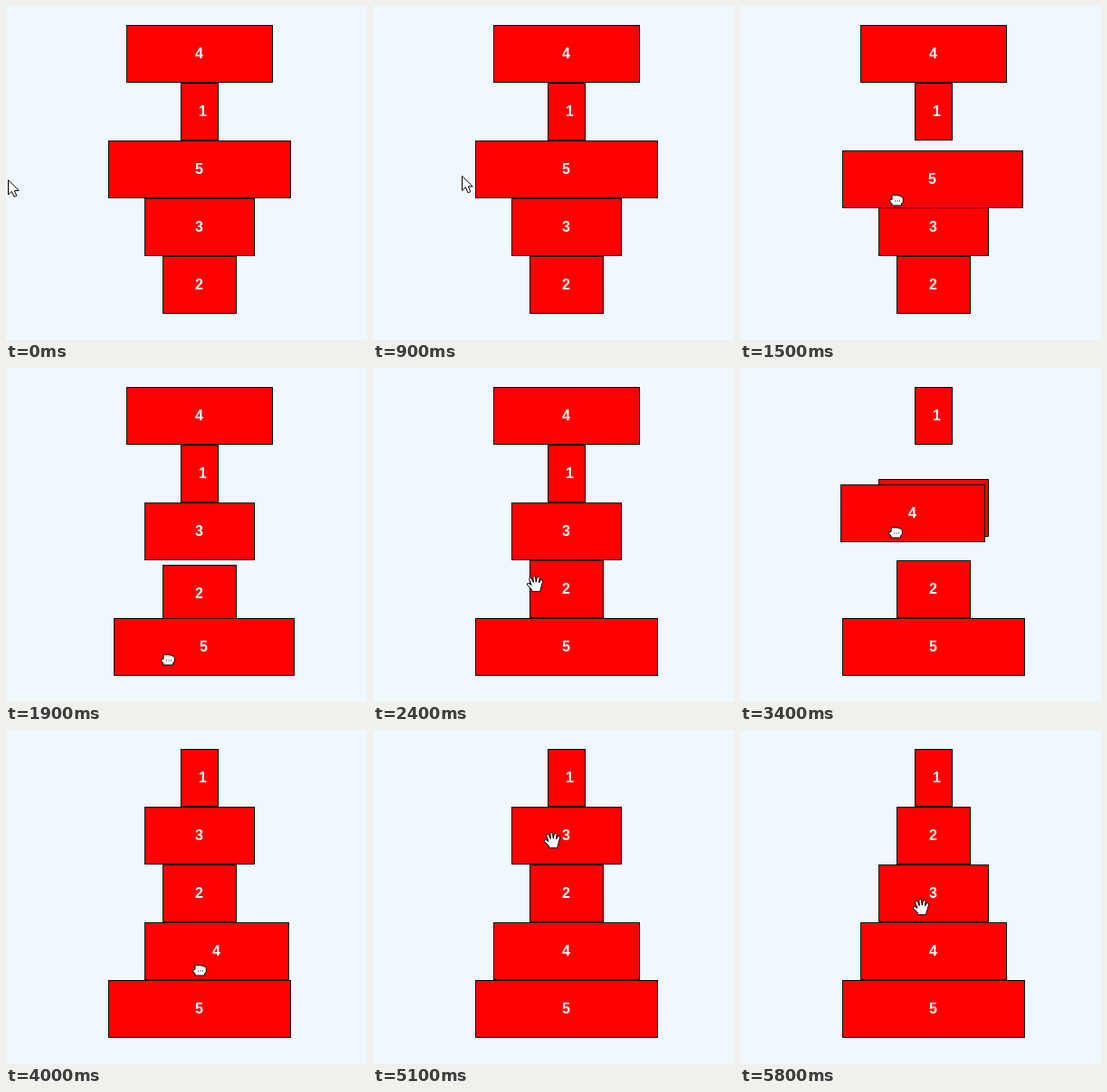
An HTML page for the animation above (6.3 s loop, 399x370 px).

```html
<!DOCTYPE html>
<html lang="en">
<head>
<meta charset="utf-8">
<title>Sorting blocks</title>
<style>
  html, body { margin: 0; width: 100%; height: 100%; overflow: hidden; background: #f0f8ff; }
  .block {
    position: absolute; left: 0; top: 0; height: 64px; box-sizing: border-box;
    border: 1px solid #000; background: #f00; color: #fff; text-indent: -1px;
    font: bold 16px/62px "Liberation Sans", Arial, sans-serif; text-align: center;
  }
  .block:first-child { padding-left: 8px; }
  .drag { z-index: 1; }
  svg { position: absolute; left: 0; top: 0; z-index: 2; overflow: visible; }
  svg path { fill: #fff; stroke: #000; stroke-linejoin: round; }
</style>
</head>
<body>
<div id="stage"></div>
<svg id="pointer" width="20" height="22">
  <path id="arrow" d="M.5 .8V17L4.4 13.4L7 19.4L9.8 18.2L7.3 12.4H12.2Z"/>
  <path id="open" transform="translate(-9.5 -9.5)" d="M6.5 18.2L5.5 15.5L.9 10.8Q.5 8.6 2.8 9L5.5 11L3.2 4.5Q3.2 2.3 5.4 3L7.8 8L7.4 2Q8.5 0 10 1.8L10.7 7.6L12 2.2Q13.8 1 14.6 3L14 8.5L15.8 5.2Q18.4 4.4 18.2 6.8L16.6 12.5L15 18.2Z"/>
  <path id="closed" transform="translate(-8 -6.5)" d="M3 12.5V10.5L.8 8.5V6H3V2.5Q3 1 4.7 1Q6 1 6.2 1.6Q8 .2 9.3 1.6Q11 .8 12.2 2.3Q15 2 15.3 4.5V8.5L13.5 10.5V12.5ZM6.5 7v1M9 7v1M11.5 7v1"/>
</svg>
<script>
const LOOP = 6300, TICK = 100, TOP = 21, ROW = 64;
const GLIDE = 215, GAP = 120, SNAP = 10;

// Each drag: held block, grip inside it, and the blocks it passes, from time `pass` on.
const order = [4, 1, 5, 3, 2];
const drags = [
  { n: 5, grab: 1400, drop: 2100, grip: [60, 55], passed: [3, 2], pass: 1604 },
  { n: 4, grab: 3300, drop: 4000, grip: [61, 53], passed: [1, 3, 2], pass: 3185 },
  { n: 3, grab: 5300, drop: 5500, grip: [85, 37], passed: [2], pass: 5380 }
];

// Pointer key points: [time, x, y]
const path = [
  [600, 2, 192], [1000, 130, 186], [1200, 178, 204], [1400, 174, 206], [1500, 173, 215],
  [1900, 179, 323], [2100, 234, 339], [2400, 179, 239], [2700, 179, 239], [2900, 177, 53],
  [3100, 176, 72], [3400, 172, 182], [3600, 180, 266], [4000, 214, 266], [4400, 197, 154],
  [4700, 197, 133], [5100, 198, 122], [5300, 198, 148], [5500, 200, 189], [5600, 200, 196]
];

// The picture moves only within these spans and rests in between.
const spans = [
  [0, 0], [700, 1200], [1400, 2400], [2800, 2900], [3100, 3100], [3300, 3400], [3600, 3600],
  [4000, 4000], [4200, 4400], [4600, 4700], [5000, 5100], [5300, 5300], [5500, 5600], [5800, 5800]
];

const $ = id => document.getElementById(id);
const clamp = (v, lo, hi) => Math.min(hi, Math.max(lo, v));
const mix = (a, b, p) => a + (b - a) * p;
const glide = ms => 0.5 - Math.cos(Math.PI * clamp(ms / GLIDE, 0, 1)) / 2;
const move = (el, x, y) => el.style.transform = `translate(${x}px, ${y}px)`;

function shownTime(t) {
  const [from, to] = spans.findLast(s => s[0] <= t);
  return clamp(Math.floor(t / TICK) * TICK, from, to);
}

function pointerAt(t) {
  const i = path.findIndex(k => k[0] > t);
  if (i < 1) return (i ? path.at(-1) : path[0]).slice(1);
  const [a, b] = [path[i - 1], path[i]];
  const p = (t - a[0]) / (b[0] - a[0]);
  return [mix(a[1], b[1], p), mix(a[2], b[2], p)];
}

// A held block follows the pointer and clings to a row when close to it.
function heldAt({ grip }, t) {
  const [px, py] = pointerAt(t);
  const y = py - grip[1];
  const row = TOP + ROW * clamp(Math.round((y - TOP) / ROW), 0, 4);
  return [px - grip[0], Math.abs(y - row) < SNAP ? row : y];
}

function blockAt(n, t) {
  const home = 213 - 20 * n;
  let x = home, y = TOP + ROW * order.indexOf(n), held = false;
  for (const d of drags) {
    const k = d.passed.indexOf(n);
    if (k >= 0) y -= ROW * glide(t - d.pass - k * GAP);
    if (d.n === n && t >= d.grab) {
      const p = glide(t - d.drop);
      const [hx, hy] = heldAt(d, Math.min(t, d.drop));
      x = mix(hx, home, p);
      y = mix(hy, y + ROW * d.passed.length, p);
      held = p < 1;
    }
  }
  return { x: Math.round(x), y: Math.round(y), held };
}

const blocks = [1, 2, 3, 4, 5].map(n => {
  const el = document.createElement("div");
  el.textContent = n;
  el.className = "block";
  $("stage").append(el);
  return { n, el };
});

function draw(t) {
  for (const { n, el } of blocks) {
    const { x, y, held } = blockAt(n, t);
    el.classList.toggle("drag", held);
    el.style.width = 40 * n + (held ? 0 : 2) + "px";
    move(el, x, y);
  }
  const [x, y] = pointerAt(t);
  const gripped = drags.some(d => t >= d.grab && t <= d.drop);
  const shape = t < 1000 ? "arrow" : gripped ? "closed" : "open";
  for (const id of ["arrow", "open", "closed"])
    $(id).style.display = id === shape ? "" : "none";
  move($("pointer"), x, y);
}

const start = performance.now();
function loop() {
  draw(shownTime((performance.now() - start) % LOOP));
  requestAnimationFrame(loop);
}
loop();
</script>
</body>
</html>
```
